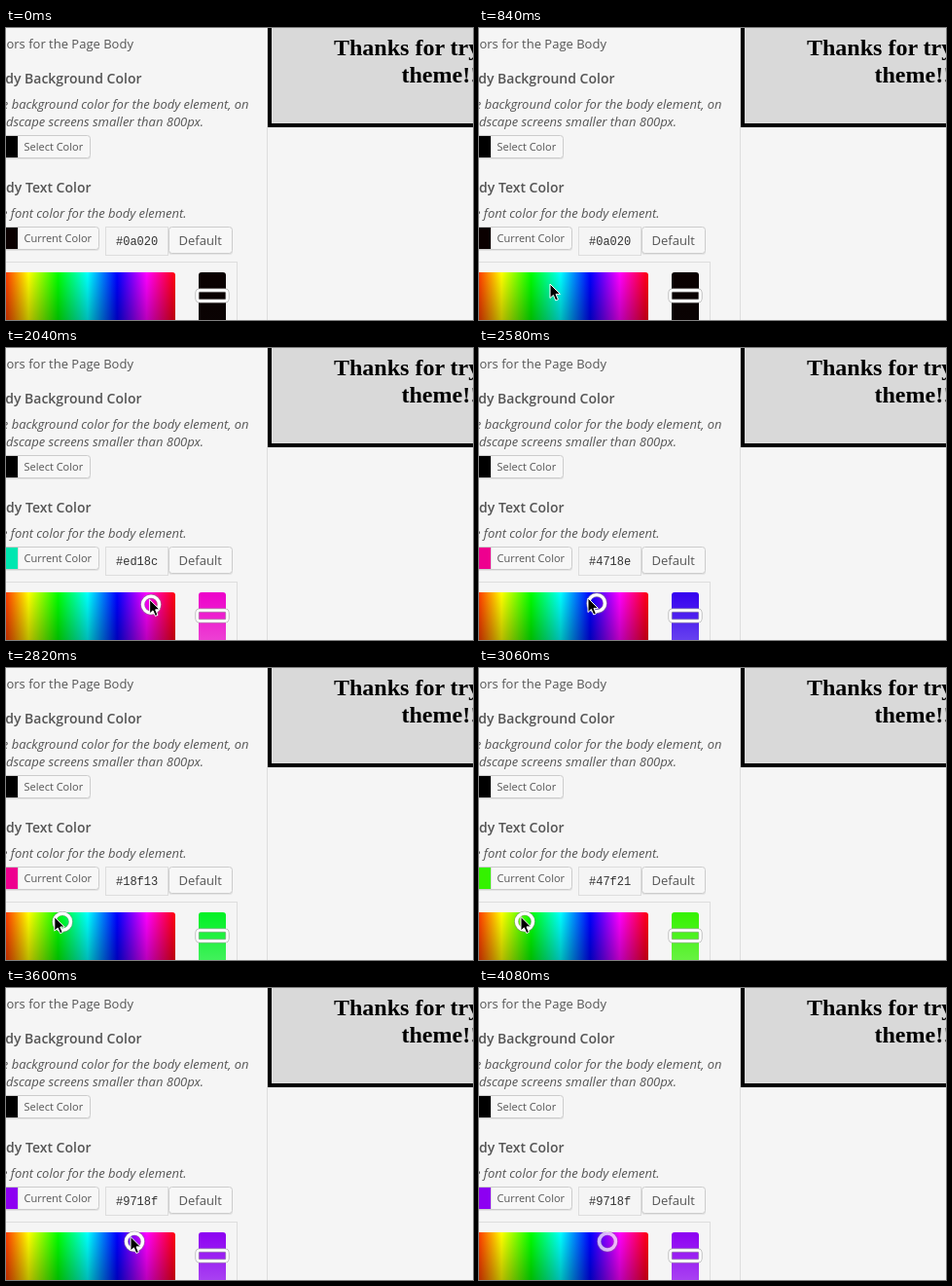
Write an HTML page that moves like this. It is 480x300 px and loops after 4320 ms.

```html
<!DOCTYPE html>
<html lang="en">
<head>
<meta charset="utf-8">
<title>Color picker</title>
<style>
  html, body { margin: 0; width: 100%; height: 100%; overflow: hidden; background: #f5f5f5; }
  svg { display: block; width: 480px; height: 300px; }
  text { font: 13px "Open Sans", sans-serif; fill: #555; white-space: pre; }
  .end { text-anchor: end; }
  .title { font-size: 14px; font-weight: 600; }
  .note { font-style: italic; }
  .small { font-size: 11px; }
  .hex { font: 12px "Liberation Mono", monospace; fill: #333; }
  .serif { font: bold 24px "Liberation Serif", serif; fill: #000; }
  .button { fill: #f7f7f7; stroke: #ccc; }
  .shade { fill: #e4e4e4; }
  .line { fill: none; stroke: #ddd; }
</style>
</head>
<body>
<svg viewBox="0 0 480 300">
  <defs>
    <linearGradient id="hues" gradientUnits="userSpaceOnUse" x1="-7.2" x2="175">
      <stop offset="0" stop-color="#f00"/>
      <stop offset=".16667" stop-color="#ff0"/>
      <stop offset=".33333" stop-color="#0f0"/>
      <stop offset=".5" stop-color="#0ff"/>
      <stop offset=".66667" stop-color="#00f"/>
      <stop offset=".83333" stop-color="#f0f"/>
      <stop offset="1" stop-color="#f00"/>
    </linearGradient>
    <linearGradient id="dark" x2="0" y2="1">
      <stop stop-opacity="0"/>
      <stop offset="1"/>
    </linearGradient>
    <linearGradient id="tones" x2="0" y2="1">
      <stop id="vivid"/>
      <stop id="pale" offset="1"/>
    </linearGradient>
  </defs>

  <rect width="480" height="300" fill="#f5f5f5"/>
  <path class="line" d="M268.5 0V300"/>
  <path d="M269 0H480V102H269Z"/>
  <path d="M273 0H480V98H273Z" fill="#d9d9d9"/>
  <text class="serif" x="337" y="28">Thanks for trying</text>
  <text class="serif" x="406.5" y="56">theme!!</text>

  <text class="end" x="131" y="21">Colors for the Page Body</text>
  <text class="title end" x="139.5" y="57">Body Background Color</text>
  <text class="note end" x="249.5" y="83">The background color for the body element, on</text>
  <text class="note end" x="203" y="101">landscape screens smaller than 800px.</text>
  <text class="title end" x="87.5" y="169">Body Text Color</text>
  <text class="note end" x="185.5" y="195">The font color for the body element.</text>

  <rect class="shade" x="-20" y="112" width="107" height="23" rx="3"/>
  <rect class="button" x="-20.5" y="110.5" width="107" height="23" rx="3"/>
  <path d="M0 111H12V133H0Z"/>
  <path class="line" d="M12.5 111V133"/>
  <text class="small" x="18.5" y="126">Select Color</text>

  <rect class="shade" x="-20" y="206" width="116" height="23" rx="3"/>
  <rect class="button" x="-20.5" y="204.5" width="116" height="23" rx="3"/>
  <path id="swatch" d="M0 205H12V227H0Z"/>
  <path class="line" d="M12.5 205V227"/>
  <text class="small" x="18.5" y="220">Current Color</text>

  <rect class="line" x="102.5" y="204.5" width="64" height="29"/>
  <text id="hex" class="hex" x="113" y="223"></text>

  <rect class="shade" x="167" y="206" width="66" height="27" rx="3"/>
  <rect class="button" x="167.5" y="204.5" width="65" height="27" rx="3"/>
  <text x="177.5" y="223">Default</text>

  <rect class="line" x="-20.5" y="240.5" width="258" height="80"/>
  <rect x="-8" y="251" width="182" height="182" rx="3" fill="url(#hues)"/>
  <rect x="-8" y="251" width="182" height="182" rx="3" fill="url(#dark)"/>
  <rect x="198" y="251" width="28" height="182" rx="3" fill="url(#tones)"/>
  <g fill="none">
    <rect x="196.5" y="269.5" width="31" height="11" rx="2.5" stroke="#aaa" stroke-width="4"/>
    <rect x="196.5" y="269.5" width="31" height="11" rx="2.5" stroke="#fff" stroke-width="2.6"/>
    <g id="ring">
      <circle r="8.5" stroke="#888" stroke-width="4.6" stroke-opacity=".7"/>
      <circle r="8.5" stroke="#fff" stroke-width="3.4"/>
    </g>
  </g>
  <path id="cursor" d="M0 0V14.5L3.4 11.4 5.8 17 8.4 15.9 6 10.4H10.4Z" stroke="#fff"/>
</svg>
<script>
  const LOOP = 4320, STEP = 60, LAG = 30;
  const PRESS = 1440, RELEASE = 3660;
  const SWATCH_TIMES = [PRESS, 2220, 3000, 3600];

  const linear = p => p;
  const easeIn = p => p * p;
  const easeOut = p => 1 - (1 - p) ** 2;
  const easeBoth = p => (1 - Math.cos(Math.PI * p)) / 2;

  // time, x, y of the cursor tip, easing on the way there
  const path = [
    [0, 219, -17, linear],
    [240, 219, -17, linear],
    [780, 72, 261, easeBoth],
    [840, 73, 263, linear],
    [PRESS, 73, 263, linear],
    [1680, 91, 263, easeIn],
    [2190, 153, 258, easeOut],
    [2340, 153, 258, linear],
    [2580, 112, 257, linear],
    [2930, 43, 255.5, easeOut],
    [3060, 43, 255.5, linear],
    [3570, 128, 255.5, easeBoth],
    [RELEASE, 128, 255.5, linear],
    [3960, 242, 12, easeBoth],
    [4080, 242, -17, easeOut],
    [LOOP, 242, -17, linear]
  ];

  const el = id => document.getElementById(id);
  const [swatch, hex, vivid, pale, ring, cursor] =
    ["swatch", "hex", "vivid", "pale", "ring", "cursor"].map(el);

  function tipAt(t) {
    const i = path.findIndex(key => key[0] > t);
    const [t0, x0, y0] = path[i - 1];
    const [t1, x1, y1, ease] = path[i];
    const k = ease((t - t0) / (t1 - t0));
    return { x: x0 + (x1 - x0) * k, y: y0 + (y1 - y0) * k };
  }

  // The ring trails the cursor a little while dragging.
  function ringAt(t) {
    const tip = tipAt(Math.min(t - LAG, RELEASE - STEP));
    return { x: Math.round(tip.x + 4), y: tip.y + 5 };
  }

  const pick = ({ x, y }) => ({
    h: Math.round((x + 7.2) * 1.976),
    v: 1 - (y - 251) / 182
  });

  function rgb({ h, v }, s) {
    return [5, 3, 1].map(n => {
      const k = (n + h / 60) % 6;
      return Math.round(255 * v * (1 - s * Math.max(0, Math.min(k, 4 - k, 1))));
    });
  }

  const css = (color, s) => `rgb(${rgb(color, s)})`;
  const toHex = parts => "#" + parts.map(n => n.toString(16).padStart(2, "0")).join("");
  const move = (node, { x, y }) => node.setAttribute("transform", `translate(${x} ${y})`);

  function draw(t) {
    const picked = t >= PRESS;
    const spot = ringAt(Math.max(t, PRESS));
    const color = picked ? pick(spot) : { h: 0, v: .04 };
    const shown = SWATCH_TIMES.filter(time => time <= t).pop();

    move(cursor, tipAt(t));
    move(ring, spot);
    ring.style.display = picked ? "" : "none";
    ring.style.opacity = t > RELEASE ? .72 : 1;
    hex.textContent = picked ? toHex(rgb(color, .9)).slice(0, 6) : "#0a020";
    swatch.style.fill = css(shown ? pick(ringAt(shown)) : color, 1);
    vivid.style.stopColor = css(color, 1);
    pale.style.stopColor = css(color, 0);
  }

  const start = performance.now();
  function tick() {
    const t = (performance.now() - start) % LOOP;
    draw(Math.floor(t / STEP) * STEP);
    requestAnimationFrame(tick);
  }
  tick();
</script>
</body>
</html>
```
